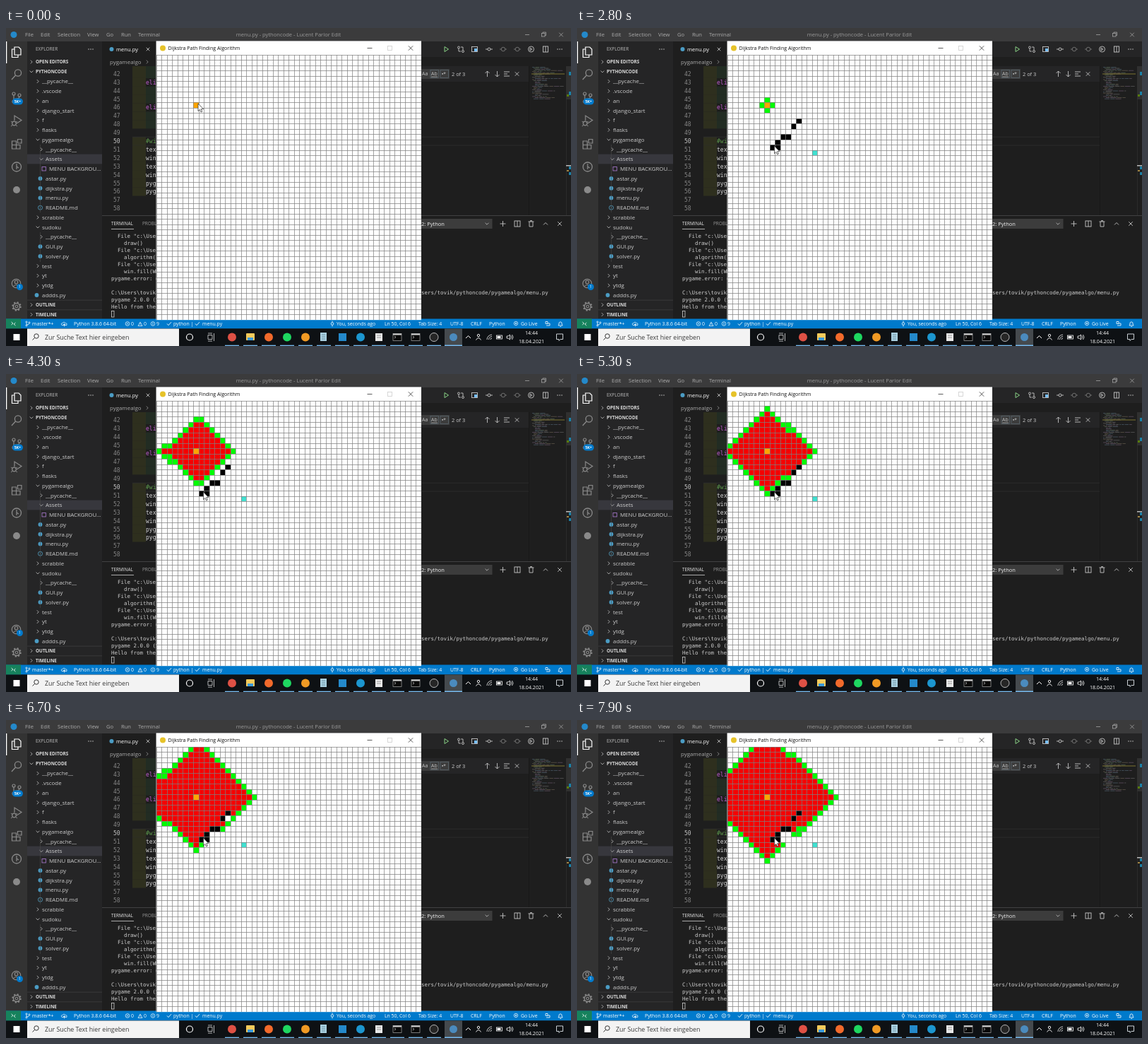
Animation, 800 px wide and 450 px high, one loop 8 s. Source, as an HTML page with a canvas:

```html
<!DOCTYPE html>
<html lang="en">
<head>
<meta charset="utf-8">
<title>Dijkstra Path Finding Algorithm</title>
<style>
html, body { margin: 0; width: 100%; height: 100%; overflow: hidden; background: #1e1e1e; }
#stage { position: relative; width: 800px; height: 450px; overflow: hidden; }
#stage > * { position: absolute; left: 0; top: 0; }
#stage > #grid { left: 213px; top: 38px; }
text { font-family: "Open Sans", "Noto Sans", sans-serif; white-space: pre; }
.mono { font-family: "DejaVu Sans Mono", "Noto Sans Mono", monospace; }
</style>
</head>
<body>
<div id="stage">
  <svg id="desk" width="800" height="450"></svg>
  <canvas id="grid" width="375" height="375"></canvas>
  <svg width="800" height="450">
    <path id="cursor" d="M0 0V10.6L2.4 8.4 4 12 5.8 11.2 4.2 7.7H7.5Z" fill="#fff" stroke="#222" stroke-width=".7"/>
  </svg>
</div>
<script>
const out = [];
const esc = s => s.replace(/&/g, '&amp;').replace(/</g, '&lt;');
const box = (x, y, w, h, fill, extra = '') =>
  out.push(`<rect x="${x}" y="${y}" width="${w}" height="${h}" fill="${fill}" ${extra}/>`);
const dot = (x, y, r, fill, extra = '') =>
  out.push(`<circle cx="${x}" cy="${y}" r="${r}" fill="${fill}" ${extra}/>`);
const line = (d, color = '#c5c5c5', w = .9) =>
  out.push(`<path d="${d}" fill="none" stroke="${color}" stroke-width="${w}"/>`);
// y is the vertical middle of the text
const text = (x, y, s, color = '#ccc', size = 7.6, extra = '') =>
  out.push(`<text x="${x}" y="${y + size * .35}" fill="${color}" font-size="${size}" ${extra}>${esc(s)}</text>`);
const mono = (x, y, s, color, size) => text(x, y, s, color, size, 'class="mono"');
const cross = (x, y, r, color, w) =>
  line(`M${x - r} ${y - r}l${2 * r} ${2 * r}m0 ${-2 * r}l${-2 * r} ${2 * r}`, color, w);
const chevron = (x, y, open, color = '#c5c5c5') =>
  line(open ? `M${x - 2.4} ${y - 1.2}l2.4 2.4 2.4-2.4` : `M${x - 1.2} ${y - 2.4}l2.4 2.4-2.4 2.4`, color, .8);
const ring = (x, y, r, color = '#c5c5c5', w = .9) => dot(x, y, r, 'none', `stroke="${color}" stroke-width="${w}"`);
const frame = (x, y, w, h, color = '#c5c5c5', sw = .9) => box(x, y, w, h, 'none', `stroke="${color}" stroke-width="${sw}"`);

function drawTitleBar() {
  const c = '#a2a2a2';
  box(0, 0, 800, 19, '#3b3b3c');
  dot(11, 9.5, 4.5, '#2489ca');
  [[27, 'File'], [49, 'Edit'], [73, 'Selection'], [115, 'View'], [142, 'Go'], [163, 'Run'], [187, 'Terminal']]
    .forEach(([x, s]) => text(x, 9.5, s, '#acacac'));
  text(400, 9.5, 'menu.py - pythoncode - Lucent Parlor Edit', '#9a9a9a', 7.6, 'text-anchor="middle"');
  line('M735 9.5h6', c, .8);
  frame(758.5, 7.5, 4.5, 4.5, c, .8);
  line('M760 7.500v-1.500h4.500v4.500h-1.500', c, .8);
  cross(786, 9.5, 2.8, c, .8);
}

function drawActivityBar() {
  const c = '#8a8a8a';
  box(0, 19, 30, 392.5, '#333333');
  box(0, 19, 1.3, 31, '#fff');
  line('M12 27h6l3 3v8h-9zM12 30h-3.5v11.500h8.500v-3', '#fff', 1.2);
  ring(17, 63.500, 4.6, c, 1.3);
  line('M13.500 67l-5.500 6', c, 1.3);
  ring(11, 93, 2, c, 1.2); ring(19, 95, 2, c, 1.2); ring(11, 104, 2, c, 1.2);
  line('M11 95v7q0-2 4-2t4-3', c, 1.2);
  box(9, 99.500, 15, 9, '#007acc', 'rx="4.5"');
  text(16.500, 104, '5K+', '#fff', 5.2, 'text-anchor="middle" font-weight="700"');
  line('M12 131v-7l10 6.500-7 4.500', c, 1.2);
  ring(11.500, 135, 2.8, c, 1.2);
  line('M7 132l2 1.500M7 139l2-1.500M16 132l-2 1.500M16 139l-2-1.500', c, 1);
  line('M8.500 160h6v11h-6zM8.500 165.500h11.500v5.500h-6M16.500 157.500h5.500v5.500h-5.500z', c, 1.2);
  ring(15, 196.500, 6.5, c, 1.3);
  line('M15 192v8M15 196l3 2', c, 1.2);
  dot(15, 229, 5, c);
  ring(14.500, 361.500, 6.2, c, 1.2);
  ring(14.500, 359.500, 2.3, c, 1.1);
  line('M10 366q4.500-5 9 0', c, 1.1);
  dot(19.500, 366.500, 4.5, '#007acc');
  text(19.500, 366.500, '1', '#fff', 5.5, 'text-anchor="middle"');
  ring(15, 394, 4.5, c, 1.4);
  ring(15, 394, 1.8, c, 1.1);
  out.push(`<circle cx="15" cy="394" r="5.8" fill="none" stroke="${c}" stroke-width="1.8" stroke-dasharray="2.1 2.45"/>`);
}

function drawSidebar() {
  box(30, 19, 106, 392.5, '#252526');
  text(42, 30, 'EXPLORER', '#bbb', 6.5);
  [117, 120, 123].forEach(x => dot(x, 30, .75, '#c5c5c5'));
  // kind: h header, c closed folder, o open folder, p script, i image, m readme; then depth
  const rows = ['h0 OPEN EDITORS', 'H0 PYTHONCODE', 'c0 __pycache__', 'c0 .vscode', 'c0 an', 'c0 django_start',
    'c0 f', 'c0 flasks', 'o0 pygamealgo', 'c1 __pycache__', 'o1 Assets', 'i2 MENU BACKGROU...', 'p1 astar.py',
    'p1 dijkstra.py', 'p1 menu.py', 'm1 README.md', 'c0 scrabble', 'o0 sudoku', 'c1 __pycache__', 'p1 GUI.py',
    'p1 solver.py', 'c0 test', 'c0 yt', 'c0 ytdg', 'p0 addds.py', 'h0 OUTLINE', 'h0 TIMELINE'];
  rows.forEach((row, i) => {
    const y = 48 + 13.75 * i, kind = row[0], x = 51 + 5 * row[1], name = row.slice(3);
    if (/h/i.test(kind)) {
      if (kind === 'h' && i) box(30, y - 7, 106, .7, '#414142');
      chevron(36, y, kind === 'H');
      return text(42, y, name, '#ddd', 6.4, 'font-weight="700"');
    }
    if (name === 'Assets') box(30, y - 6.9, 106, 13.75, '#37373d');
    if (kind === 'c' || kind === 'o') chevron(x - 6, y, kind === 'o');
    if (kind === 'p') dot(x - 7.5, y, 2.9, '#4b9cc4');
    if (kind === 'i') frame(x - 10, y - 2.7, 5.4, 5.4, '#a074c4');
    if (kind === 'm') { ring(x - 7.5, y, 3, '#519aba'); line(`M${x - 7.5} ${y - 1.5}v3`, '#519aba'); }
    text(x, y, name, '#ccc', 7.9);
  });
  line('M48.500 165v96M48.500 289v42', '#4a4a4a', .6);
}

function drawToolbarIcons() {
  line('M621 26.500l5.500 3.500-5.500 3.500z', '#89d185', 1);
  ring(641, 27.500, 1.5); ring(647, 33, 1.5); line('M641 29v4h3M647 31v-4h-3');
  frame(659.500, 26.500, 8, 7); box(663, 29, 4, 4, '#75beff');
  ring(684, 30, 2); line('M679 30h3M686 30h3');
  ring(704, 30, 2.8, '#777'); line('M699 30h2M707 30h2', '#777');
  ring(724, 30, 2.8, '#777'); line('M719 30h2M727 30h2', '#777');
  ring(743.500, 30, 4); line('M742 28l3 2-3 2z');
  frame(760.500, 26, 7, 8); line('M764 26v8');
  [781, 784, 787].forEach(x => dot(x, 30, .75, '#c5c5c5'));
}

function drawMinimap() {
  let seed = 7;
  const rnd = () => (seed = seed * 16807 % 2147483647) / 2147483647;
  const colors = ['#575757', '#4f5c4e', '#5a5346', '#45545f', '#5b4d5d'];
  for (let y = 55; y < 101; y += 1.6) {
    let x = 745 + Math.floor(rnd() * 3) * 2;
    const end = x + 6 + rnd() * rnd() * 36;
    while (x < end) {
      const w = 2 + rnd() * 7;
      box(x, y, w, .8, colors[Math.floor(rnd() * 5)]);
      x += w + 1;
    }
  }
  box(744, 64.500, 47, 1, '#7d7530');
  box(740, 54, 1, 211, '#181818');
  box(793, 54, .6, 211, '#353535');
  box(793, 54, 7, 47, '#303030');
  box(797, 62, 3, 5, '#1b81a8');
  box(797, 90, 3, 5, '#1b81a8');
  box(794, 94, 3, 3, '#587c0c');
  box(793, 194, 7, 1.5, '#bbb');
  box(797, 196, 3, 4, '#1b81a8');
  box(797, 204, 3, 4, '#1b81a8');
  box(794, 201, 3, 2, '#a08443');
}

function drawEditor() {
  const outer = '#2e2f1e', inner = '#222c23';
  box(136, 19, 664, 22, '#252526');
  box(136, 19, 76, 22, '#1e1e1e');
  dot(149.500, 30, 3, '#4b9cc4');
  text(156, 30, 'menu.py', '#fff');
  cross(201, 30, 2.3);
  text(147, 48, 'pygamealgo', '#a9a9a9', 7.9);
  chevron(200, 48, false, '#999');
  drawToolbarIcons();

  const code = { 43: 'elif', 46: 'elif', 50: '#wind', 51: 'text', 52: 'win.', 53: 'text', 54: 'win.', 55: 'pyga', 56: 'pyga' };
  for (let n = 42; n <= 58; n++) {
    const y = 65 + 11.9 * (n - 42), top = y - 6;
    if (n !== 49 && n < 57) box(179, top, 19, 12, outer);
    if (n < 49 && !code[n]) box(198, top, 14, 12, inner);
    if (n === 50) line(`M179 ${top}h561M179 ${top + 11.9}h561`, '#303030', .8);
    mono(152, y, String(n), n === 50 ? '#c6c6c6' : '#858585', 8);
    if (code[n]) mono(198, y, code[n], n < 49 ? '#c35fd0' : n === 50 ? '#5f9a4c' : '#d4d4d4', 8);
  }
  box(179, 54, 19, 6, outer);
  box(198, 54, 14, 6, inner);

  box(580, 54, 160, 22, '#252526');
  box(580, 58, 48, 14, '#3c3c3c');
  [601, 615].forEach(x => frame(x, 59.5, 11.5, 11, '#5c6a72', .7));
  text(589, 65, 'Aa', '#c5c5c5', 7);
  text(602, 65, 'Ab', '#c5c5c5', 7);
  line('M602 69h9', '#c5c5c5', .7);
  text(617, 65, '▪*', '#c5c5c5', 6.5);
  text(631, 65, '2 of 3', '#ccc', 7.4);
  line('M681.500 69v-8m-3 3l3-3 3 3M695.500 61v8m-3-3l3 3 3-3M705 62h8M705 65h5M705 68h8');
  cross(723.500, 65, 2.7);
  drawMinimap();
}

function drawPanel() {
  const pitch = 10.05, size = 7.48, c = '#ccc';
  box(136, 265, 664, .8, '#4a4a4b');
  text(149, 277, 'TERMINAL', '#e7e7e7', 6.4);
  line('M149 284.500h32', '#e7e7e7', .7);
  text(193, 277, 'PROBLEMS', '#969696', 6.4);
  box(570, 270, 118.500, 14, '#3c3c3c');
  text(588, 277, '2: Python', '#f0f0f0', 7.5);
  chevron(681, 277, true);
  line('M699.500 277h8m-4-4v8');
  frame(720, 273, 8, 8); line('M724 273v8');
  line('M739.500 274h8M741 274v7h5v-7M742.500 274v-1.500h2v1.500');
  line('M761 278.500l3-3 3 3');
  cross(784, 277, 2.8);
  const rows = [String.raw`  File "c:\User`, '    draw()', String.raw`  File "c:\User`, '    algorithm(l',
    String.raw`  File "c:\User`, '    win.fill(WH', 'pygame.error: d', '', String.raw`C:\Users\tovik\p`,
    'pygame 2.0.0 (S', 'Hello from the '];
  rows.forEach((s, i) => mono(149, 294 + pitch * i, s, c, size));
  mono(588, 294 + pitch * 8, 'sers/tovik/pythoncode/pygamealgo/menu.py', c, size);
  frame(149.500, 400.500, 3.500, 8.500, c, .8);
}

function drawStatusBar() {
  box(0, 411.500, 800, 14, '#007acc');
  box(0, 411.500, 21, 14, '#16825d');
  line('M7.500 416l2.500 2-2.500 2M13.500 417l-2.500 2 2.500 2', '#fff', .8);
  ring(29, 416, 1.1, '#fff', .7); ring(29, 421, 1.1, '#fff', .7); ring(33, 417, 1.1, '#fff', .7);
  line('M29 417v3q4 0 4-2', '#fff', .7);
  line('M79 420.500q-2-3 1.500-3 1-3 3.500 0 3 0 2 3zM82.500 422.500v-4m-1.500 1.500l1.500-1.500 1.500 1.500', '#fff', .7);
  ring(172, 418.500, 2.8, '#fff', .7); cross(172, 418.500, 1.1, '#fff', .7);
  line('M187 421.500h6l-3-5.500zM190 418v1.800', '#fff', .7);
  ring(208, 418.500, 2.8, '#fff', .7); line('M208 417v3', '#fff', .7);
  [228, 268].forEach(x => line(`M${x} 418.500l2 2.200 4-4.500`, '#fff', .9));
  ring(462, 418.500, 1.8, '#fff', .8); line('M462 414.500v2M462 420.500v2', '#fff', .8);
  [[37, 'master*+'], [96, 'Python 3.8.6 64-bit'], [177, '0'], [195, '0'], [213, '9'], [237, 'python |'],
    [278, 'menu.py'], [468, 'You, seconds ago'], [536, 'Ln 50, Col 6'], [584, 'Tab Size: 4'], [629, 'UTF-8'],
    [658, 'CRLF'], [684, 'Python'], [729, 'Go Live']].forEach(([x, s]) => text(x, 418.500, s, '#fff', 6.9));
  dot(722, 418, 1, '#fff'); ring(722, 418, 2.7, '#fff', .7);
  line('M764 415.500h3v3h-3zM767 418h3v3h-5', '#fff', .8);
  line('M782 421h6l-1-2v-2q-2-2.500-4 0v2zM784.500 422.500h1.500', '#fff', .8);
}

function drawTaskbar() {
  box(0, 425.500, 800, 24.500, '#0e1114');
  box(10.500, 433, 9, 9, '#fff');
  box(30, 425.500, 215, 24.500, '#f3f3f3');
  ring(43, 436, 3.2, '#222', .9); line('M40.500 438.500l-3 3', '#222', .9);
  text(55, 438, 'Zur Suche Text hier eingeben', '#3a3a3a', 8.85);
  ring(260, 437.500, 4.5, '#fff', 1.2);
  line('M286 434.500h6v6h-6zM286 432h6M286 443h6M294.500 432v11', '#ddd', .8);
  box(621, 425.500, 25, 24.500, '#454a4e');
  dot(320, 437.500, 6, '#de5145');
  box(340, 432, 12, 10, '#f5cb5b', 'rx="1"'); box(342, 438, 8, 4, '#3d9ad8');
  dot(372, 437.500, 6, '#f26a2b');
  dot(398, 437.500, 6, '#1ed760');
  dot(424, 437.500, 6, '#f09a24');
  box(445, 431, 9, 12, '#a9cfdf'); line('M447 434h5M447 437h5M447 440h5', '#5a7f90', .7);
  box(471, 432, 11, 11, '#2489ca');
  dot(502, 437.500, 6, '#1c96cf');
  box(523, 432, 10, 11, '#e8e8e8'); line('M525 435h6M525 438h6', '#777', .7);
  [554, 580].forEach(x => {
    box(x - 6, 432.500, 12, 10, '#090909', 'stroke="#a8a8a8" stroke-width=".7"');
    box(x - 6, 432.500, 12, 2, '#d0d0d0');
    line(`M${x - 4} 436l2 1.500-2 1.500`, '#ddd', .7);
  });
  dot(606, 437.500, 6, '#262626', 'stroke="#ddd" stroke-width=".8"');
  dot(633.500, 437.500, 5.500, '#4b8bbe');
  [320, 346, 372, 398, 424, 450, 476, 502, 528, 554, 580, 606].forEach(x => box(x - 10, 448.700, 20, 1.300, '#76b9ed'));
  box(621, 448.500, 25, 1.500, '#76b9ed');
  line('M651 439l3.500-3.500 3.500 3.500', '#fff', 1);
  ring(669, 435, 1.700, '#fff', .9); line('M665.500 441.500q3.500-6 7 0', '#fff', .9);
  line('M681 441a7 7 0 0 1 7-7M683.500 441a4.500 4.500 0 0 1 4.500-4.500M686 441a2 2 0 0 1 2-2', '#ddd', .9);
  frame(694.500, 435, 8, 5, '#fff', .8); box(695.500, 436, 5, 3, '#fff');
  line('M709 436h2l2.500-2v7l-2.500-2h-2zM715 435.500q2 2 0 4M716.500 434q3 3.500 0 7', '#fff', .8);
  text(744, 431.800, '14:44', '#fff', 7.100, 'text-anchor="middle"');
  text(744, 443.500, '18.04.2021', '#fff', 7.100, 'text-anchor="middle"');
  line('M779.500 433h9v7.500h-3.500l-2 2v-2h-3.500z', '#dfe6ea', .9);
}

function drawWindow() {
  box(212.6, 18.4, 375.4, 394.8, '#fff');
  dot(222, 28.500, 4, '#e6c229');
  text(229.500, 28.500, 'Dijkstra Path Finding Algorithm', '#111', 7.05);
  line('M511.500 28.500h7', '#333', .8);
  frame(540.500, 25.500, 6, 6, '#ccc', .8);
  cross(573, 28.500, 3.2, '#333', .8);
}

box(0, 0, 800, 450, '#1e1e1e');
[drawTitleBar, drawActivityBar, drawSidebar, drawEditor, drawPanel, drawStatusBar, drawTaskbar, drawWindow].forEach(f => f());
document.getElementById('desk').innerHTML = out.join('');

const N = 50, GAP = 7.5, TICK = 100, LOOP = 8000;
const SEARCH_TICK = 28, POPS_PER_TICK = 4.855, GOAL_TICK = 8;
const start = [7, 9], goal = [16, 18];
// column, row, tick at which the wall is painted
const walls = [[13, 12, 14], [12, 13, 15], [11, 15, 17], [10, 15, 18], [9, 16, 19], [9, 17, 22], [8, 17, 23]];
// tick, x, y of the pointer tip
const moves = [[0, 272, 107], [9, 337, 176], [10, 337, 176], [14, 315, 131], [19, 284, 162], [21, 284, 162], [24, 279.5, 167]];

// Every edge costs 1, so the priority queue behaves as a plain queue.
function search() {
  const key = (x, y) => x + y * N;
  const blocked = new Set(walls.map(([x, y]) => key(x, y)));
  const seen = new Set([key(...start)]);
  const queue = [{ x: start[0], y: start[1], opened: 0 }];
  for (let i = 0; i < queue.length; i++) {
    const { x, y } = queue[i];
    for (const [dx, dy] of [[1, 0], [-1, 0], [0, 1], [0, -1]]) {
      const u = x + dx, v = y + dy, k = key(u, v);
      if (u < 0 || v < 0 || u >= N || v >= N || blocked.has(k) || seen.has(k)) continue;
      seen.add(k);
      queue.push({ x: u, y: v, opened: i + 1 });
    }
  }
  return queue;
}

const order = search();
const ctx = document.getElementById('grid').getContext('2d');
const cursor = document.getElementById('cursor');

function paint(x, y, color) {
  const px = Math.floor(x * GAP), py = Math.floor(y * GAP);
  ctx.fillStyle = color;
  ctx.fillRect(px, py, Math.floor((x + 1) * GAP) - px, Math.floor((y + 1) * GAP) - py);
}

function drawGrid(tick) {
  ctx.fillStyle = '#fff';
  ctx.fillRect(0, 0, 375, 375);
  if (tick >= SEARCH_TICK) {
    const pops = 1 + Math.round(POPS_PER_TICK * (tick - SEARCH_TICK));
    order.forEach((c, i) => {
      if (c.opened <= pops) paint(c.x, c.y, i + 1 < pops ? '#f40000' : '#0f0');
    });
  }
  walls.forEach(([x, y, at]) => { if (tick >= at) paint(x, y, '#000'); });
  if (tick >= GOAL_TICK) paint(...goal, '#40e0d0');
  paint(...start, '#ffa500');
  ctx.fillStyle = 'rgba(128,128,128,.72)';
  for (let i = 0; i < N; i++) {
    const p = Math.floor(i * GAP);
    ctx.fillRect(p, 0, 1, 375);
    ctx.fillRect(0, p, 375, 1);
  }
}

function moveCursor(tick) {
  const i = moves.findIndex(m => m[0] > tick);
  let [, x, y] = moves[moves.length - 1];
  if (i > 0) {
    const [t0, x0, y0] = moves[i - 1], [t1, x1, y1] = moves[i];
    const p = (tick - t0) / (t1 - t0);
    x = x0 + (x1 - x0) * p;
    y = y0 + (y1 - y0) * p;
  }
  cursor.setAttribute('transform', `translate(${x} ${y})`);
}

const began = performance.now();
let shown = -1;
function render() {
  const tick = Math.floor((performance.now() - began) % LOOP / TICK);
  if (tick !== shown) {
    shown = tick;
    drawGrid(tick);
    moveCursor(tick);
  }
  requestAnimationFrame(render);
}
render();
</script>
</body>
</html>
```
